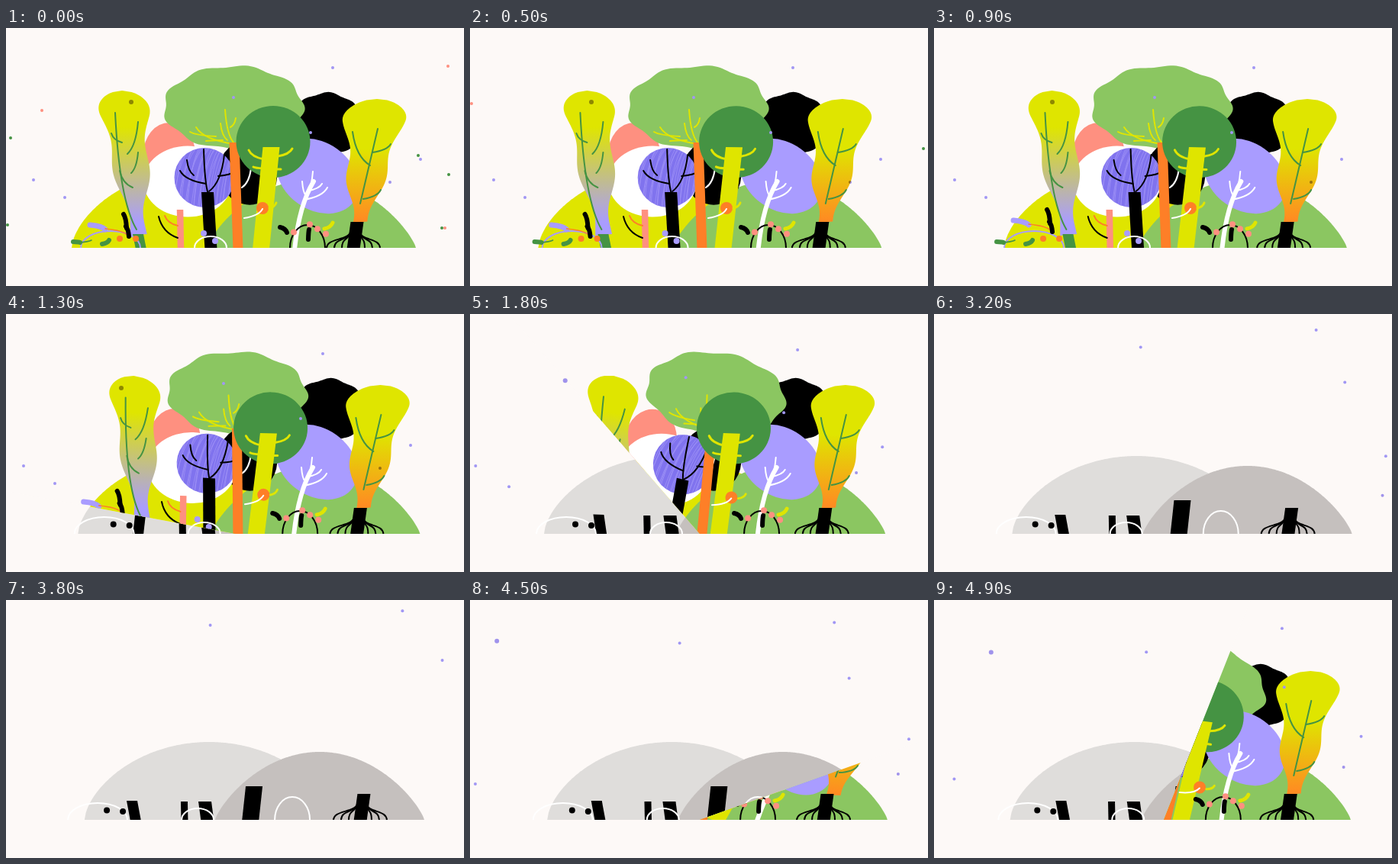
These frames come from a looping animation (600x338 px, 5000 ms). An HTML page with a canvas:

```html
<!DOCTYPE html>
<html lang="en">
<head>
<meta charset="utf-8">
<title>Forest sweep</title>
<style>
html, body { margin: 0; width: 100%; height: 100%; overflow: hidden; background: #fdf9f7 }
canvas { display: block }
</style>
</head>
<body>
<canvas id="stage" width="600" height="338"></canvas>
<script>
const c = document.getElementById('stage').getContext('2d');
const BG = '#fdf9f7', LIME = '#dfe500', GREEN = '#8bc661', DARK = '#459343', LILAC = '#a99cff',
  ORANGE = '#fe7f27', CORAL = '#fe9080', BLACK = '#000', WHITE = '#fff';
const GROUND = 288, PIVOT = 301;
// x, y, then outward drift; the last two darken what they cross
const DOTS = [[415, 52, 36, -13], [285, 91, -6, -20], [386, 137, 64, -20], [530, 172, 26, 6],
  [23, 199, -40, 0], [64, 222, -33, 11], [490, 202, 41, 15], [151, 97, -67, -25]];
const STRAYS = [[47, 108], [6, 144], [2, 258], [579, 50], [540, 167], [580, 192], [575, 262], [571, 262]];

function fill(color) { c.fillStyle = color; c.fill(); }
function stroke(color, width) { c.strokeStyle = color; c.lineWidth = width; c.stroke(); }
function oval(color, x, y, rx, ry = rx, turn = 0) {
  c.beginPath();
  c.ellipse(x, y, rx, ry, turn, 0, 7);
  fill(color);
}
// an oval with a wavy rim
function cloud(color, x, y, rx, ry, lobes, phase) {
  c.beginPath();
  for (let a = 0; a < 6.28; a += .04) {
    const r = 1 + .03 * Math.sin(lobes * a + phase);
    c.lineTo(x + rx * r * Math.cos(a), y + ry * r * Math.sin(a));
  }
  fill(color);
}
// a tapering crown with a bulge at the given part of its height
function pear(color, x, slant, top, bottom, wide, narrow, bulge) {
  const side = (v, s) => {
    const cap = Math.sqrt(1 - (1 - Math.min(1, v / .18)) ** 2);
    const w = cap * (wide + (narrow - wide) * v + 4 * Math.cos(4 * Math.PI * (v - bulge)));
    c.lineTo(x + slant * v + s * w, top + (bottom - top) * v);
  };
  c.beginPath();
  for (let v = 0; v <= 1; v += .01) side(v, 1);
  for (let v = 1; v >= 0; v -= .01) side(v, -1);
  fill(color);
}
function hill(color, x, half, height, power) {
  c.beginPath();
  for (let u = -1; u <= 1; u += .01) c.lineTo(x + half * u, GROUND - height * (1 - u * u) ** power);
  c.lineTo(x + half, GROUND);
  fill(color);
}
function post(color, x, y, foot, width) {
  const h = width / 2;
  c.beginPath();
  c.moveTo(x - h, y);
  c.lineTo(x + h, y);
  c.lineTo(foot + h, 290);
  c.lineTo(foot - h, 290);
  fill(color);
}
function arch(color, x, rx, ry) {
  c.beginPath();
  c.ellipse(x, GROUND, rx, ry, 0, Math.PI, 0);
  stroke(color, 2);
}
// each twig starts at x, y, leaves sideways and bends towards its tip at dx, dy
function twigs(color, width, ...list) {
  for (const [x, y, dx, dy] of list) {
    c.beginPath();
    c.moveTo(x, y);
    c.quadraticCurveTo(x + dx * .8, y + dy * .25, x + dx, y + dy);
    stroke(color, width);
  }
}
function fade(y0, y1, a, b) {
  const g = c.createLinearGradient(0, y0, 0, y1);
  g.addColorStop(0, a);
  g.addColorStop(1, b);
  return g;
}
// shifts sideways and leans (degrees) about a foot on the ground
function group(x, shift, lean, draw) {
  c.save();
  c.translate(x + shift, GROUND);
  c.rotate(lean * Math.PI / 180);
  c.translate(-x, -GROUND);
  draw();
  c.restore();
}
// degrees of lean once the sweep begins to push
const push = (t, from, rate) => Math.max(0, t - from) * rate / 1000;

function hills(left, right, d) {
  group(0, 17 * (d - 1), 0, () => hill(left, 266, 163, 102, .62));
  group(0, 11 * (d - 1), 0, () => hill(right, 411, 137, 89, .8));
}
function roots() {
  post(BLACK, 460, 254, 455, 17);
  for (const s of [-1, 1]) for (const reach of [15, 25, 35]) {
    c.beginPath();
    c.moveTo(457 + 5 * s, 266);
    c.bezierCurveTo(457 + 9 * s, 280, 455 + reach * s, 274, 455 + reach * s, 289);
    stroke(BLACK, 2);
  }
}

function bareScene(t, d) {
  const back = 1 - d;
  hills('#dfdddb', '#c5c0be', d);
  group(170, 7 * back, 17 * Math.exp(-(((t - 1300) / 350) ** 2)), () => post(BLACK, 165, 263, 170, 14));
  group(0, -5 * back, 0, () => post(BLACK, 233.5, 264, 234, 9));
  group(0, 4 * back, 0, () => post(BLACK, 260.5, 264, 264, 17));
  group(0, 13 * back, 0, () => post(BLACK, 325, 244, 320, 22));
  group(0, 9 * d, 0, roots);
  group(0, -17 * d, 0, () => {
    arch(WHITE, 137, 39, 22);
    arch(WHITE, 268, 21, 15);
    oval(BLACK, 149, 275.5, 4);
    oval(BLACK, 170, 277, 4);
  });
  group(0, -20 * d, 0, () => arch(WHITE, 395, 23, 30));
}

function bushyCrown() {
  cloud(GREEN, 298, 104, 91, 54, 9, 1.2);
  twigs(LIME, 2, [299, 152, -50, -22], [275, 142, -34, -6], [284, 147, -22, 1], [290, 147, -9, -22],
    [298, 150, -11, -43], [294, 130, 7, -12]);
}
function leafyTree(t, d) {
  group(175, 7 * d, push(t, 1000, 11), () => {
    pear(fade(130, 255, LIME, LILAC), 152, 22, 82, 272, 35, 9, .58);
    twigs(DARK, 2, [171, 264, -28, -153], [152, 150, -14, -12], [159, 165, 14, -42], [164, 190, 9, -27],
      [166, 209, -17, -22]);
    post(DARK, 173, 270, 177, 14);
  });
}
function violetTree(t, d) {
  group(266, -4 * d, push(t, 1150, 21), () => {
    oval('#8073ee', 260, 196, 39.5, 39);
    c.save();
    c.clip();
    for (let i = 0; i < 34; i++) twigs('#9d91f6', .8, [226 + i * 2.9, 154, -22 + 5 * Math.sin(i * 2), 84]);
    c.restore();
    twigs(BLACK, 2, [265, 218, -6, -59], [262, 204, -34, -17], [246, 193, -9, -20], [266, 214, 20, -48],
      [278, 194, 21, -6]);
    post(BLACK, 264, 215, 268.5, 16);
  });
}
function paleTree(t, d) {
  group(378, -2 * d, push(t, 2430, 35), () => {
    oval(LILAC, 408, 194, 58, 44, .62);
    c.beginPath();
    c.moveTo(378, 290);
    c.quadraticCurveTo(384, 232, 403, 201);
    stroke(WHITE, 6);
    twigs(WHITE, 2, [393, 220, -5, -19], [395, 214, 7, -26], [390, 225, 31, -16], [396, 213, 18, -9]);
  });
}
function darkTree(t, d) {
  group(334, -13 * d, 2.5 * d + push(t, 2265, 40), () => {
    oval(DARK, 350, 149, 48.5, 47);
    post(LIME, 347.5, 156, 334, 22);
    twigs(LIME, 3, [338, 172, -20, -12], [356, 168, 19, -10], [337, 184, -13, -2], [353, 185, 7, 0]);
  });
}
function lemonTree(t, d) {
  group(455, 9 * d, push(t, 2600, 35), () => {
    pear(fade(158, 252, LIME, '#ff8b22'), 486, -22, 93, 255, 43, 11, .66);
    twigs(DARK, 2, [477, 180, -23, -44], [480, 163, 24, -11], [468, 224, 23, -12]);
    c.beginPath();
    c.moveTo(464, 230);
    c.lineTo(487, 132);
    stroke(DARK, 2);
  });
  group(0, 9 * d, 0, roots);
}
function lowPlants(t, d) {
  group(0, -17 * d, 0, () => {
    arch(LILAC, 137, 39, 22);
    group(0, 0, 0, () => {
      c.translate(0, -push(t, 500, 15));
      twigs(LILAC, 7, [110, 258, 20, 6]);
      twigs(ORANGE, 1.5, [130, 263, 30, 9]);
      twigs(BLACK, 6, [154, 244, 4, 18], [157, 260, 4, 13]);
    });
    twigs(DARK, 6, [88, 280, 9, 1], [126, 283, 9, -5]);
    twigs(DARK, 1.5, [94, 281, 18, -3]);
    for (const x of [149, 170]) oval(ORANGE, x, 276, 4);
    arch(WHITE, 268, 21, 15);
    for (const s of [0, 1]) oval(LILAC, 259 + 15 * s, 269 + 10 * s, 4);
  });
  group(0, -20 * d, 0, () => {
    arch(BLACK, 395, 23, 30);
    twigs(BLACK, 6, [359, 261, 9, 7], [397, 264, -1, 13]);
    twigs(LIME, 5, [417, 263, 11, -8]);
    for (const x of [377, 398, 408, 419]) oval(CORAL, x, 256 + Math.abs(x - 396) * .6, 4);
  });
}

function colorScene(t, d) {
  const fall = push(t, 1180, 12), sag = push(t, 1150, 14);
  group(420, 7 * d, push(t, 2500, 30), () => cloud(BLACK, 420, 126, 46, 41, 8, 1));
  group(220, 5 * d, sag, () => oval(CORAL, 214, 165, 34, 41));
  group(305, 0, fall, bushyCrown);
  hills(LIME, GREEN, d);
  group(320, 0, push(t, 2200, 20), () => {
    oval(BLACK, 317, 190, 38, 42, -.3);
    twigs(WHITE, 2, [309, 209, 12, -25]);
  });
  group(228, 5 * d, sag, () => {
    oval(WHITE, 238, 201, 58, 46.5);
    post(CORAL, 228, 238, 229, 8.5);
    twigs(ORANGE, 2, [225, 259, -17, -13]);
    twigs(BLACK, 2, [225, 275, -25, -28]);
  });
  violetTree(t, d);
  group(305, 0, fall, () => post(ORANGE, 299, 150, 304, 13));
  paleTree(t, d);
  darkTree(t, d);
  group(305, 0, fall, () => {
    oval(ORANGE, 336, 236, 8);
    twigs(WHITE, 2, [312, 249, 24, -12]);
    twigs(LIME, 3, [345, 236, 9, -7]);
  });
  leafyTree(t, d);
  lemonTree(t, d);
  lowPlants(t, d);
}

function drawDots(s) {
  const early = 13 - 10 * Math.min(1.3, s), out = Math.max(0, s - 1.3) ** 1.35;
  DOTS.forEach(([x, y, vx, vy], i) => {
    c.globalCompositeOperation = i < 6 ? 'source-over' : 'multiply';
    oval('#a197f4', x + early + vx * out, y + vy * out, i < 7 ? 2 : 3);
  });
  c.globalCompositeOperation = 'source-over';
  STRAYS.forEach(([x, y], i) =>
    oval(i % 3 ? DARK : CORAL, x + (x < 300 ? -90 : 108) * s, y - 18 * s, 2));
}

function draw(now) {
  // ten steps a second, running forward and then partly back
  const step = Math.floor(now % 5000 / 100) * 100;
  const t = step < 3700 ? step : 7300 - step;
  const d = 1 - (1 - Math.min(1, t / 3600)) ** 1.5;
  const swept = Math.min(1, Math.max(0, (t - 1050) / 1900)) ** 1.4;
  c.fillStyle = BG;
  c.fillRect(0, 0, 600, 338);
  c.lineCap = c.lineJoin = 'round';
  c.save();
  c.beginPath();
  c.rect(0, 0, 600, GROUND);
  c.clip();
  bareScene(t, d);
  if (swept < 1) {
    c.beginPath();
    c.moveTo(PIVOT, GROUND);
    c.arc(PIVOT, GROUND, 900, Math.PI * (swept - 1), 0);
    c.clip();
    c.fillStyle = BG;
    c.fillRect(0, 0, 600, GROUND);
    colorScene(t, d);
  }
  c.restore();
  drawDots(t / 1000);
}

const start = performance.now();
function tick() {
  draw(performance.now() - start);
  requestAnimationFrame(tick);
}
tick();
</script>
</body>
</html>
```
